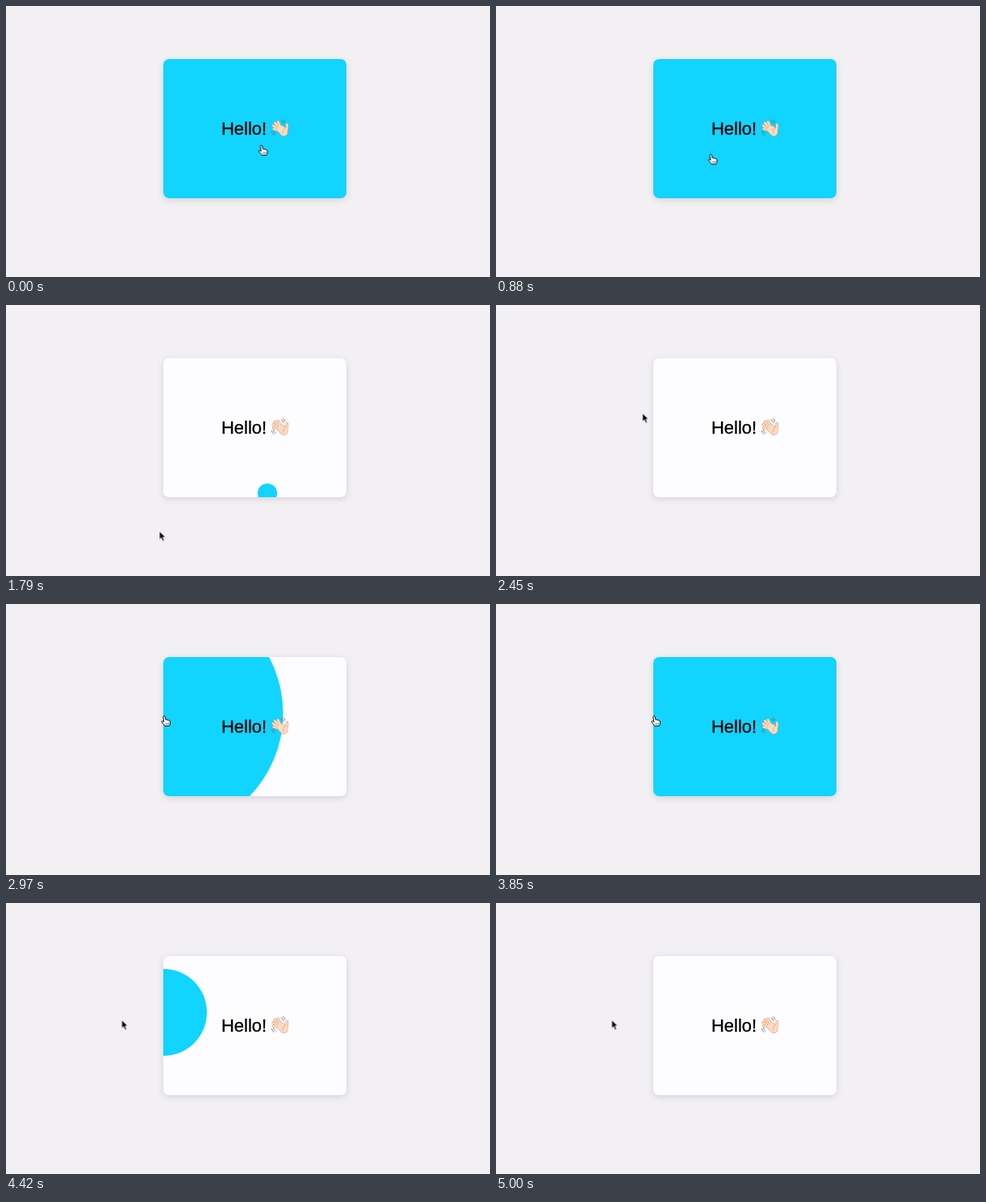
Animation of 600 by 337 pixels, one loop 5.03 s. Source, as an HTML page:

```html
<!DOCTYPE html>
<html lang="en">
<head>
<meta charset="utf-8">
<title>Hover ripple card</title>
<style>
  html, body { margin: 0; width: 100%; height: 100%; overflow: hidden; background: #f2f0f2; }
  #stage { position: relative; width: 600px; height: 337px; overflow: hidden; }
  #card, #ripple { position: absolute; border-radius: 7px; }
  #card {
    left: 195px; top: 66px; width: 227px; height: 173px;
    background: #fdfcff; box-shadow: 0 2px 8px rgba(0, 0, 0, .13);
  }
  #ripple { inset: 0; background: #11d4ff; }
  svg { position: absolute; left: 0; top: 0; }
  text { font: 22px "Liberation Sans", Arial, sans-serif; stroke: #000; stroke-width: .3; }
  .wave { fill: none; stroke-linecap: round; stroke-linejoin: round; }
</style>
</head>
<body>
<div id="stage">
  <div id="card"><div id="ripple"></div></div>
  <svg width="600" height="337" viewBox="0 0 600 337">
    <text x="266.9" y="160.4">Hello!</text>
    <g id="wave" class="wave"></g>
    <g class="wave" stroke="#5d6670" stroke-width=".8">
      <path d="M341.2 142.6Q343.6 143.8 344.2 146.4M343.6 141.4Q345.6 142.4 346 144.6"/>
      <path d="M331.4 155.2Q331.8 157.8 334 159.4M329.4 156.4Q330 159 332 160.6"/>
    </g>
    <g id="cursor">
      <path id="arrow" stroke="#fff" stroke-width=".8"
        d="M0 0V10.4L2.3 8.2L4.1 12.3L6 11.4L4.3 7.5H7.4Z"/>
      <g id="hand" stroke="#111" stroke-linejoin="round">
        <path fill="#fff" d="M-1.3 1Q0-.9 1.1 1L2 5Q3.2 4.2 4 5.3Q5.3 4.7 5.8 5.9Q7.2 5.5 7.4 7L7.6 9Q7.4 11 6.5 12.4L1 12.9Q0 11-2 9.2Q-3.6 7.4-2.8 6.8Q-1.6 6.4-.2 7.6Z"/>
        <path fill="none" stroke-width=".6" d="M2.1 9L2.5 11.4M3.9 8.8L4.3 11.2M5.5 8.6L5.8 10.8"/>
      </g>
    </g>
  </svg>
</div>
<script>
const LOOP = 5030, FADE = 1000, RADIUS = 340, STEP = 10;
const $ = id => document.getElementById(id);

// Waving hand: a fan of four fingers, a thumb and a round palm.
function drawWave() {
  const skin = "#fbdac2", edge = "#d99670";
  const stroke = (d, width, color) =>
    `<path d="${d}" stroke="${color}" stroke-width="${width}"/>`;
  const outlined = (d, width) => stroke(d, width + .4, edge) + stroke(d, width - .5, skin);
  const palm = "M341.4 153.6L344.4 156.8";
  let art = stroke(palm, 10.2, edge) + outlined("M346.4 156.5Q349.2 152.5 348.2 147.4", 3);
  for (let i = 3; i >= 0; i--) {
    const angle = (-114 - 18 * i) * Math.PI / 180;
    const length = 12.9 - .8 * (i - 1.2) ** 2;
    const x = 342 + length * Math.cos(angle), y = 155 + length * Math.sin(angle);
    art += outlined(`M342 155L${x} ${y}`, 3.2);
  }
  $("wave").innerHTML = art + stroke(palm, 9.2, skin) +
    stroke("M345 152.6Q342.6 155 343.4 158.4", .6, edge);
}

// Rows are [time in ms, properties, easing towards the next row].
function play(element, rows) {
  const frames = rows.map(([time, props, easing = "linear"]) =>
    ({ offset: time / LOOP, easing, ...props }));
  element.animate(frames, { duration: LOOP, iterations: Infinity });
}

const leaveBottom = 1029, enterLeft = 2708, leaveLeft = 3879;
const bottom = "129px 168px", left = "0px 70px";
const disc = (r, at) => ({ clipPath: `circle(${r}px at ${at})` });
const fade = (start, from, to, at) =>
  [[start, disc(from, at), "ease"], [start + FADE, disc(to, at)]];

play($("ripple"), [
  [0, disc(RADIUS, bottom)],
  ...fade(leaveBottom, RADIUS, 0, bottom),
  ...fade(enterLeft, 0, RADIUS, left),
  ...fade(leaveLeft, RADIUS, 0, left),
  [LOOP, disc(0, left)],
]);

// Key points [time, x, y] of the pointer tip.
const keys = [
  [0, 316.5, 173], [590, 316.5, 173], [810, 251, 181], [880, 266, 184],
  [leaveBottom, 324, 235], [1120, 326, 265], [1450, 210.5, 297], [1690, 206, 298.5],
  [2090, 119, 172], [2450, 181.5, 134.5], [2790, 196, 139],
  [3850, 196, 139], [4110, 143.5, 145.5], [LOOP, 143.5, 145.5],
];

const slope = (i, axis) => keys[i] && keys[i + 1]
  ? (keys[i + 1][axis] - keys[i][axis]) / (keys[i + 1][0] - keys[i][0]) : 0;

// Harmonic mean of both slopes: smooth, and never overshoots a key point.
function tangent(i, axis) {
  const a = slope(i - 1, axis), b = slope(i, axis);
  return a * b > 0 ? 2 * a * b / (a + b) : 0;
}

function glide(time, axis) {
  const i = Math.max(0, keys.findIndex(key => key[0] >= time) - 1);
  const [start, end] = [keys[i], keys[i + 1]];
  const span = end[0] - start[0], u = (time - start[0]) / span, v = 1 - u;
  return v * v * (1 + 2 * u) * start[axis] + u * u * (1 + 2 * v) * end[axis]
    + u * v * span * (v * tangent(i, axis) - u * tangent(i + 1, axis));
}

play($("cursor"), Array.from({ length: LOOP / STEP + 1 }, (_, n) => {
  const time = n * STEP;
  return [time, { transform: `translate(${glide(time, 1)}px, ${glide(time, 2)}px)` }];
}));

const show = (id, inside, outside) => play($(id), [
  [0, inside], [leaveBottom, outside], [enterLeft + 30, inside],
  [leaveLeft, outside], [LOOP, outside],
].map(([time, opacity]) => [time, { opacity }, "step-end"]));

show("hand", 1, 0);
show("arrow", 0, 1);
drawWave();
</script>
</body>
</html>
```
